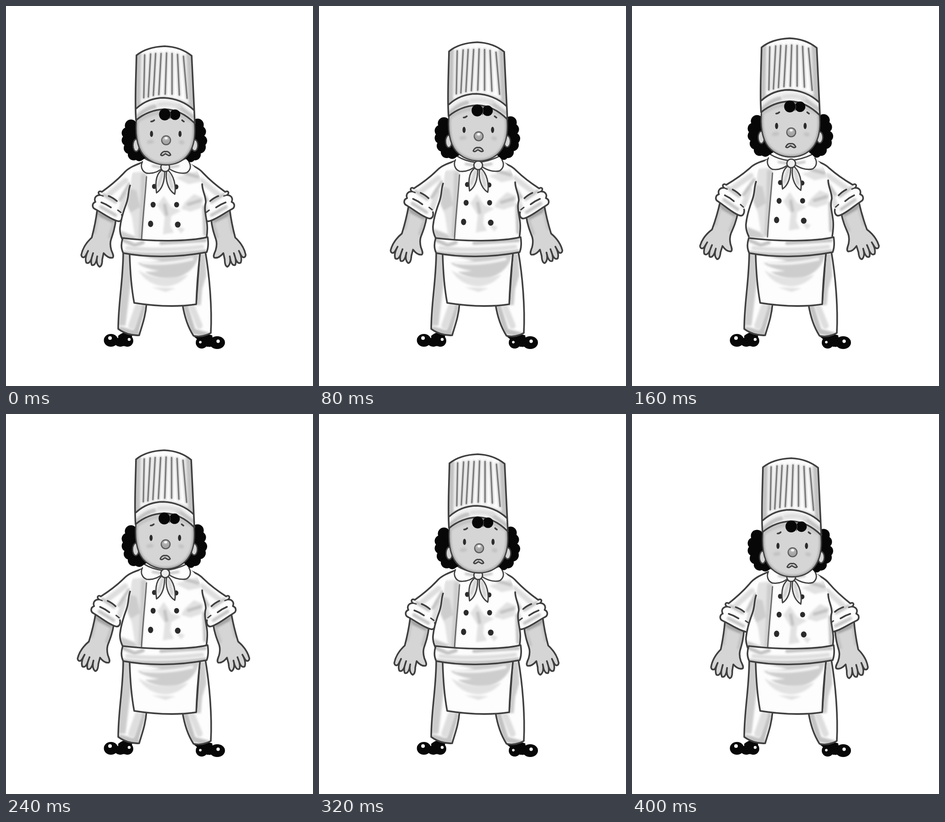
An HTML page without scripts for the animation above (480 ms loop, 673 px wide and 832 px high).

```html
<!DOCTYPE html>
<html lang="en">
<head>
<meta charset="utf-8">
<title>Breathing chef</title>
<style>
  @property --lift { syntax: "<number>"; inherits: true; initial-value: 0; }

  html, body { margin: 0; width: 100%; height: 100%; overflow: hidden; background: #fff; }
  svg {
    display: block; width: 673px; height: 832px;
    --lift: 0;
    animation: breathe 480ms step-end infinite;
  }
  /* --lift is the height of the breath, every moving part follows it */
  @keyframes breathe {
    0%, 66.6667%, 100% { --lift: 0; }
    16.6667%, 50% { --lift: 1; }
    33.3333% { --lift: 2; }
    83.3333% { --lift: -1; }
  }
  .body { transform: translateY(calc(var(--lift) * -4.2px)); }
  .hair { transform: translateY(calc(var(--lift) * -4.9px)); }
  .head { transform: translate(calc(var(--lift) * -1px), calc(var(--lift) * -8.7px)); }
  .arm { transform-origin: 285px 365px; transform: rotate(calc(var(--lift) * 2.6deg)); }

  .ink { fill: none; stroke: #3f3f3f; stroke-width: 3.6; stroke-linecap: round; stroke-linejoin: round; }
  .thin { stroke-width: 2.8; }
  .white { fill: #fdfdfd; }
  .skin { fill: #d5d5d5; }
  .dark { fill: #2b2b2b; }
  .black { fill: #070707; }
  .wash { filter: url(#soft); fill: none; stroke: #c2c2c2; stroke-linecap: round; stroke-linejoin: round; }
  .pale { stroke: #dedede; }
  .deep { stroke: #a2a2a2; }
  .blot { filter: url(#soft); fill: #cdcdcd; }
  .faint { fill: #e2e2e2; }
</style>
</head>
<body>
<svg viewBox="0 0 673 832">
  <defs>
    <filter id="soft" filterUnits="userSpaceOnUse" x="100" y="60" width="480" height="700">
      <feGaussianBlur stdDeviation="2.2"/>
    </filter>

    <path id="hat" d="M286 108C303 94 325 89 348 88C372 89 392 97 407 109L414 257C392 235 370 226 347 226C323 227 302 236 285 250C282 210 285 160 286 108Z"/>
    <path id="face" d="M286 248C283 276 286 308 301 326C315 342 334 348 350 348C369 348 387 341 399 326C413 308 416 280 413 252C392 215 310 212 286 248Z"/>
    <path id="torso" d="M298 344L400 343C416 350 426 370 430 392C430 405 438 415 438 430C433 445 440 465 441 480C442 492 441 512 439 525H256C252 505 249 495 250 485C252 465 258 448 264 432C270 415 267 408 272 393C272 370 281 352 298 344Z"/>
    <path id="sleeve" d="M300 342C284 348 268 354 258 366C242 383 224 397 210 407C203 403 200 410 206 414C197 414 192 421 196 429C188 432 188 442 196 445C213 454 229 467 245 471C253 473 256 465 254 457L280 400L310 344Z"/>
    <path id="forearm" d="M200 446C197 470 193 488 188 507C177 517 168 530 165 545C166 552 172 552 175 546L180 536C175 546 173 555 176 562C181 565 185 560 187 554L191 541C187 552 185 561 188 567C193 569 196 564 198 558L200 548C198 558 199 567 205 571C210 570 211 562 211 555L214 541C219 547 226 553 234 551C237 548 234 542 231 535C228 525 228 519 230 512C235 497 239 485 241 466Z"/>
    <path id="sash" d="M256 508C252 520 252 531 257 541C310 551 375 551 440 539C444 528 444 518 442 506C400 516 320 516 256 508Z"/>
    <path id="apron" d="M271 542C272 580 275 618 281 650C325 657 370 660 417 653C418 620 421 580 425 544Z"/>
    <path id="legL" d="M257 538C257 600 246 650 246 707C258 716 275 722 292 721C298 700 306 680 308 652L281 646L271 538Z"/>
    <path id="legR" d="M437 538C446 590 452 660 449 716C440 721 425 726 411 722C400 705 392 685 387 654L417 650L425 538Z"/>
    <path id="pleats" d="M304 107L302 201M317 105L312 199M328 104L323 196M340 104L335 194M352 103L349 193M364 104L364 193M376 106L380 195M389 110L397 202"/>

    <clipPath id="inHat"><use href="#hat"/></clipPath>
    <clipPath id="inFace"><use href="#face"/></clipPath>
    <clipPath id="inTorso"><use href="#torso"/></clipPath>
    <clipPath id="inSleeve"><use href="#sleeve"/></clipPath>
    <clipPath id="inForearm"><use href="#forearm"/></clipPath>
    <clipPath id="inSash"><use href="#sash"/></clipPath>
    <clipPath id="inApron"><use href="#apron"/></clipPath>
    <clipPath id="inLegL"><use href="#legL"/></clipPath>
    <clipPath id="inLegR"><use href="#legR"/></clipPath>

    <g id="arm">
      <use href="#forearm" class="skin"/>
      <g clip-path="url(#inForearm)">
        <path class="wash deep" stroke-width="9" d="M198 453L242 474"/>
        <path class="wash" stroke-width="8" d="M237 475L228 505M200 460L193 495"/>
      </g>
      <use href="#forearm" class="ink"/>
      <use href="#sleeve" class="white"/>
      <g clip-path="url(#inSleeve)">
        <path class="wash pale" stroke-width="12" d="M262 382L226 412M262 412L252 450"/>
        <path class="wash" stroke-width="7" d="M270 390L250 425M208 440L240 458M214 413L240 429"/>
      </g>
      <path class="ink" d="M300 342C284 348 268 354 258 366C242 383 224 397 210 407C203 403 200 410 206 414C197 414 192 421 196 429C188 432 188 442 196 445C213 454 229 467 245 471C253 473 256 465 254 457"/>
      <path class="ink" d="M225 416Q235 420 243 427M209 430Q220 434 230 441"/>
      <path class="ink thin" d="M206 414L213 416M245 447L252 452"/>
    </g>
  </defs>

  <!-- shoes and legs -->
  <g class="black">
    <path d="M246 722Q262 708 277 720L272 744L246 745Z"/>
    <path d="M412 724Q432 714 452 721L456 746H440Z"/>
    <ellipse cx="230" cy="732" rx="15.500" ry="14"/><ellipse cx="250" cy="736" rx="12" ry="10"/><circle cx="266" cy="733" r="13"/>
    <circle cx="429" cy="737" r="13"/><ellipse cx="446" cy="738" rx="10" ry="8.500"/><ellipse cx="463" cy="737" rx="17" ry="14"/>
  </g>
  <g fill="#fff">
    <circle cx="228" cy="727" r="4"/><circle cx="270" cy="730" r="3.2"/>
    <circle cx="426" cy="736" r="2.8"/><circle cx="465" cy="734" r="3.7"/>
  </g>
  <use href="#legL" class="white"/>
  <g clip-path="url(#inLegL)">
    <path class="blot" d="M255 540H270L274 600L268 650L262 700L246 700Z"/>
    <path class="wash" stroke-width="12" d="M300 660L284 716M252 708L288 718"/>
    <path class="wash pale" stroke-width="16" d="M290 660L276 700"/>
  </g>
  <use href="#legL" class="ink"/>
  <use href="#legR" class="white"/>
  <g clip-path="url(#inLegR)">
    <path class="blot" d="M424 542H437L439 590L430 620L427 655H414Z"/>
    <path class="wash" stroke-width="12" d="M394 658L410 712L444 721"/>
    <path class="wash pale" stroke-width="14" d="M408 660L424 700"/>
  </g>
  <use href="#legR" class="ink"/>

  <!-- upper body -->
  <g class="body">
    <use href="#arm" class="arm"/>
    <g transform="translate(690.500 0) scale(-1 1)"><use href="#arm" class="arm"/></g>
    <use href="#torso" class="white"/>
    <g clip-path="url(#inTorso)">
      <path class="blot faint" d="M276 365L306 362L298 514H284L276 462L268 440Z"/>
      <path class="blot" d="M296 368H308L298 512H290L294 440ZM272 400L286 404L294 440L274 452L266 436ZM252 492L282 504L290 516H252Z"/>
      <path class="blot faint" d="M372 376L424 360L430 384L400 390ZM392 430L412 412L432 420L428 442L404 450L384 444ZM332 436L346 416L362 440L384 448L362 460L360 480L368 496L344 500L348 462ZM370 480L392 488L384 498Z"/>
      <path class="wash" stroke-width="7" d="M392 366L420 374M400 434L426 426M348 436L352 456M434 440L436 500"/>
    </g>
    <path class="ink" d="M272 393C267 408 270 415 264 432C258 448 252 465 250 485C249 495 252 505 256 513M430 390C430 405 438 415 438 430C433 445 440 465 441 480C442 492 441 500 439 512"/>
    <path class="ink thin" stroke-opacity=".75" d="M308 374C305 420 300 460 297 514"/>
    <g class="dark">
      <ellipse cx="325" cy="395" rx="5" ry="5.5"/><ellipse cx="373" cy="396" rx="5" ry="5.5"/>
      <ellipse cx="322.500" cy="435" rx="5.500" ry="6.300"/><ellipse cx="374" cy="435" rx="5.500" ry="6"/>
      <ellipse cx="317" cy="477" rx="5.7" ry="7"/><ellipse cx="376.500" cy="478.500" rx="6.200" ry="6.600"/>
    </g>
    <path class="white" d="M302 330L298 350L308 365L348 354L396 364L404 346L398 330Z"/>
    <g class="ink thin">
      <path d="M303 333Q320 344 345 347Q372 345 396 333"/>
      <path class="white" d="M299 341C294 351 298 362 308 366C322 368 336 362 347 352"/>
      <path class="white" d="M401 341C407 351 404 360 396 365C381 369 364 362 352 352"/>
      <path class="wash" stroke-width="5" d="M322 350L340 353M378 350L360 353"/>
      <path fill="#eee" d="M345 357C331 364 326 382 330 409C341 402 348 386 348 360Z"/>
      <path fill="#eee" d="M353 358C348 378 354 402 370 412C373 395 369 370 353 358Z"/>
      <path class="wash" stroke-width="4" d="M343 366L334 394M357 368L364 398"/>
      <circle fill="#eee" cx="349" cy="353" r="9.500"/>
    </g>
  </g>

  <!-- apron -->
  <use href="#apron" class="white"/>
  <g clip-path="url(#inApron)">
    <path class="blot" d="M272 542L425 542L418 560Q408 582 372 598Q330 600 304 582Q320 582 336 580Q300 574 288 562Q310 564 340 558Z"/>
    <path class="blot faint" d="M290 578Q330 606 400 588Q380 612 350 614Q310 612 290 578ZM320 616L372 618L350 626Z"/>
    <path class="wash" stroke="#fff" stroke-width="6" style="stroke:#f6f6f6" d="M300 562Q350 568 408 554"/>
  </g>
  <path class="ink" d="M271 542C272 580 275 618 281 650C325 657 370 660 417 653C418 620 421 580 425 544"/>
  <use href="#sash" class="white"/>
  <g clip-path="url(#inSash)">
    <path class="wash" stroke-width="8" d="M258 513L282 524L300 518M340 519L436 513M258 540Q340 550 436 537"/>
    <path class="wash pale" stroke-width="9" d="M266 530Q340 538 430 527"/>
  </g>
  <use href="#sash" class="ink"/>

  <!-- curls -->
  <g class="hair black">
    <path d="M275 252L300 265L310 330L296 339L284 336L266 310Z"/>
    <circle cx="274" cy="262" r="13.500"/><circle cx="266" cy="278" r="12.500"/><circle cx="266" cy="294" r="12.500"/>
    <circle cx="271" cy="311" r="13"/><circle cx="280" cy="325" r="13"/><circle cx="292" cy="330" r="10"/>
    <path d="M418 250L400 275L388 330L402 341L424 325Z"/>
    <circle cx="420" cy="260" r="13.500"/><circle cx="426" cy="275" r="12.500"/><circle cx="428.500" cy="295" r="12.500"/>
    <circle cx="424" cy="309" r="14"/><circle cx="414" cy="325" r="13"/><circle cx="405" cy="333" r="9"/>
  </g>

  <!-- head -->
  <g class="head">
    <g class="ink thin">
      <ellipse class="skin" cx="285.500" cy="305" rx="7" ry="13.500"/>
      <ellipse class="skin" cx="413.500" cy="305" rx="7" ry="12.500"/>
    </g>
    <use href="#face" class="skin"/>
    <g clip-path="url(#inFace)">
      <use href="#face" class="wash deep" stroke-width="8"/>
      <path class="wash" stroke-width="8" d="M288 252Q345 214 408 252M313 298L320 297M383 298L387 299"/>
    </g>
    <use href="#face" class="ink thin"/>

    <g class="dark">
      <ellipse cx="319" cy="280" rx="3.400" ry="6.800"/><ellipse cx="381.500" cy="280" rx="3.400" ry="6.800"/>
    </g>
    <path class="ink" d="M318 253Q322 253 325 250M386 250Q388 252 390 253"/>
    <circle cx="351" cy="294" r="9.700" fill="#a6a6a6" stroke="#5c5c5c" stroke-width="2.500"/>
    <path class="wash" stroke-width="5" d="M346 291H354"/>
    <ellipse cx="351" cy="289.500" rx="3.500" ry="2.700" fill="#f4f4f4"/>
    <path class="ink thin" style="fill:#c4c4c4" d="M339 326C341 321 346 317 350 319C354 317 359 321 361 326C357 330 353 325 349.500 323.500C346 325 343 330 339 326Z"/>

    <use href="#hat" class="white"/>
    <g clip-path="url(#inHat)">
      <path class="wash" stroke-width="14" d="M290 105L288 224M402 106L408 230"/>
      <use href="#pleats" class="wash" stroke-width="6"/>
      <use href="#pleats" fill="none" stroke="#777" stroke-width="3" stroke-linecap="round"/>
      <path class="wash" stroke-width="6" d="M290 220Q348 184 410 222"/>
      <path fill="#f1f1f1" d="M284 224C304 208 326 201 346 201C370 202 394 211 412 228V258L347 228L284 252Z"/>
      <path class="wash" stroke-width="9" d="M289 242Q306 224 326 220M378 220L411 244"/>
      <path class="wash pale" stroke-width="9" d="M335 216Q360 212 380 220"/>
      <path class="ink" d="M286 224C304 208 326 201 346 201C370 202 394 211 412 228"/>
    </g>
    <use href="#hat" class="ink"/>
    <g class="black">
      <ellipse cx="348" cy="237.500" rx="12.500" ry="13"/><ellipse cx="370.500" cy="238" rx="11.500" ry="11.500"/>
    </g>
    <path fill="none" stroke="#3c3c3c" stroke-width="1.500" d="M359 230Q363 238 359 247"/>
  </g>
</svg>
</body>
</html>
```
